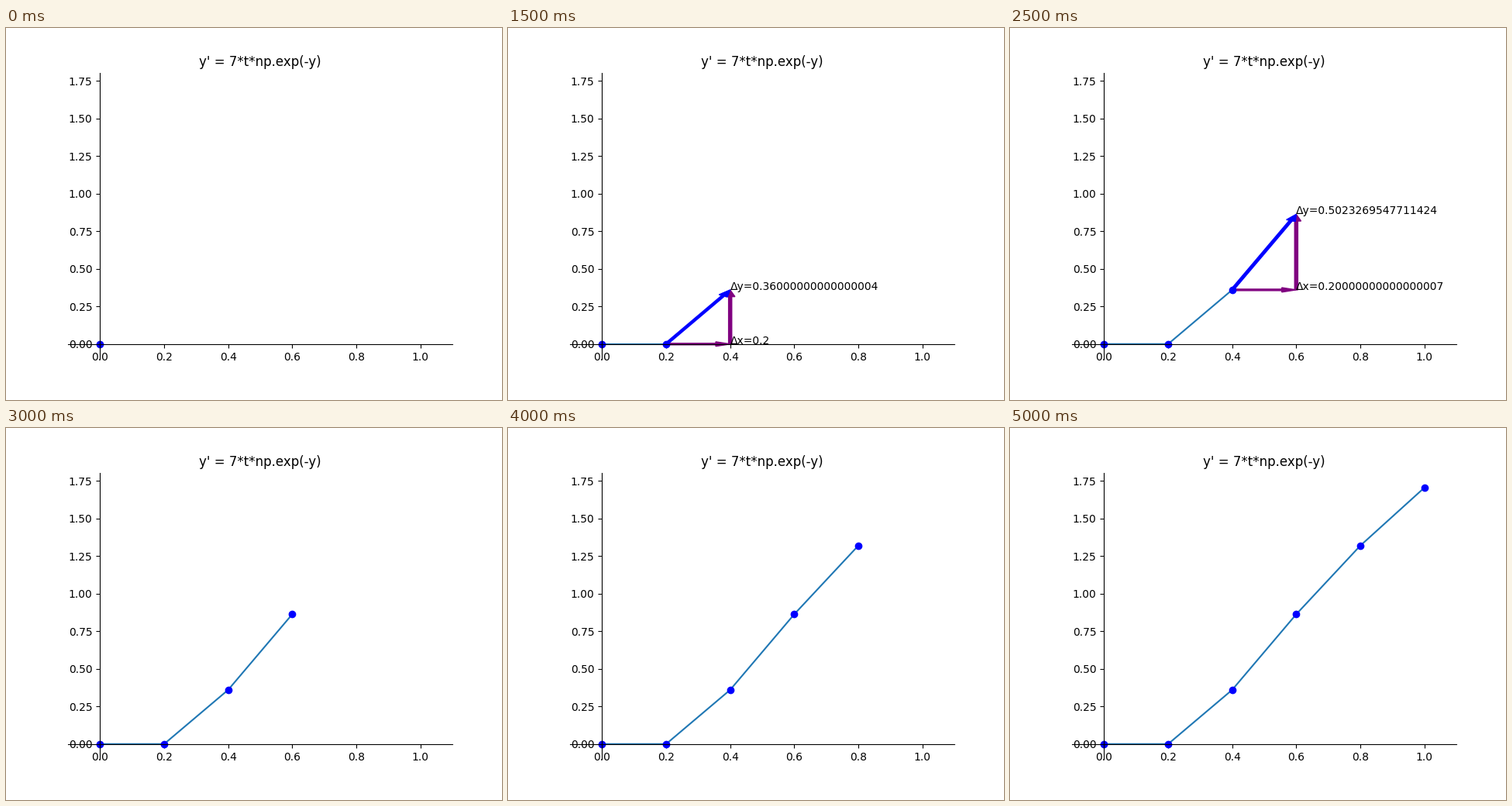
These frames come from a looping animation (640x480 px, 5.5 s). A matplotlib script:

```python
import numpy as np
import matplotlib.pyplot as plt
from matplotlib.animation import FuncAnimation

STEPS = 5
H = 0.2


def slope(t, y):
    return 9 * t * np.exp(-y)


# Euler's method
ts = np.linspace(0, 1, STEPS + 1)
ys, dys = [0.0], []
for t in ts[:-1]:
    dys.append(H * slope(t, ys[-1]))
    ys.append(ys[-1] + dys[-1])

fig, ax = plt.subplots(figsize=(6.4, 4.8), dpi=100)
ax.set_title("y' = 7*t*np.exp(-y)")
ax.set_xlim(-0.1, 1.1)
ax.set_ylim(-0.1, ys[-1] + 0.1)
for side in ("left", "bottom"):
    ax.spines[side].set_position("zero")
for side in ("right", "top"):
    ax.spines[side].set_color("none")

line, = ax.plot([], [])
dots, = ax.plot([], [], "bo")


def arrow(x, y, dx, dy, color):
    return ax.arrow(x, y, dx, dy, width=0.01, color=color,
                    length_includes_head=True)


def step_artists(i):
    """Slope triangle with its labels for step i."""
    x, y, dy = ts[i], ys[i], dys[i]
    end = ts[i + 1]
    dx = end - x
    parts = [arrow(x, y, dx, 0, "purple")]
    if dy:
        parts.append(arrow(end, y, 0, dy, "purple"))
    parts.append(arrow(x, y, dx, dy, "blue"))
    parts.append(ax.text(end, y, f"Δx={dx}"))
    parts.append(ax.text(end, y + dy, f"Δy={dy}"))
    return parts


triangles = [step_artists(i) for i in range(STEPS)]


def update(frame):
    step, show_triangle = divmod(frame, 2)
    line.set_data(ts[:step + 1], ys[:step + 1])
    dots.set_data(ts[:step + 1], ys[:step + 1])
    for i, parts in enumerate(triangles):
        for part in parts:
            part.set_visible(bool(show_triangle) and i == step)
    return []


anim = FuncAnimation(fig, update, frames=2 * STEPS + 1, interval=500,
                     repeat=True, repeat_delay=0)
plt.show()
```
